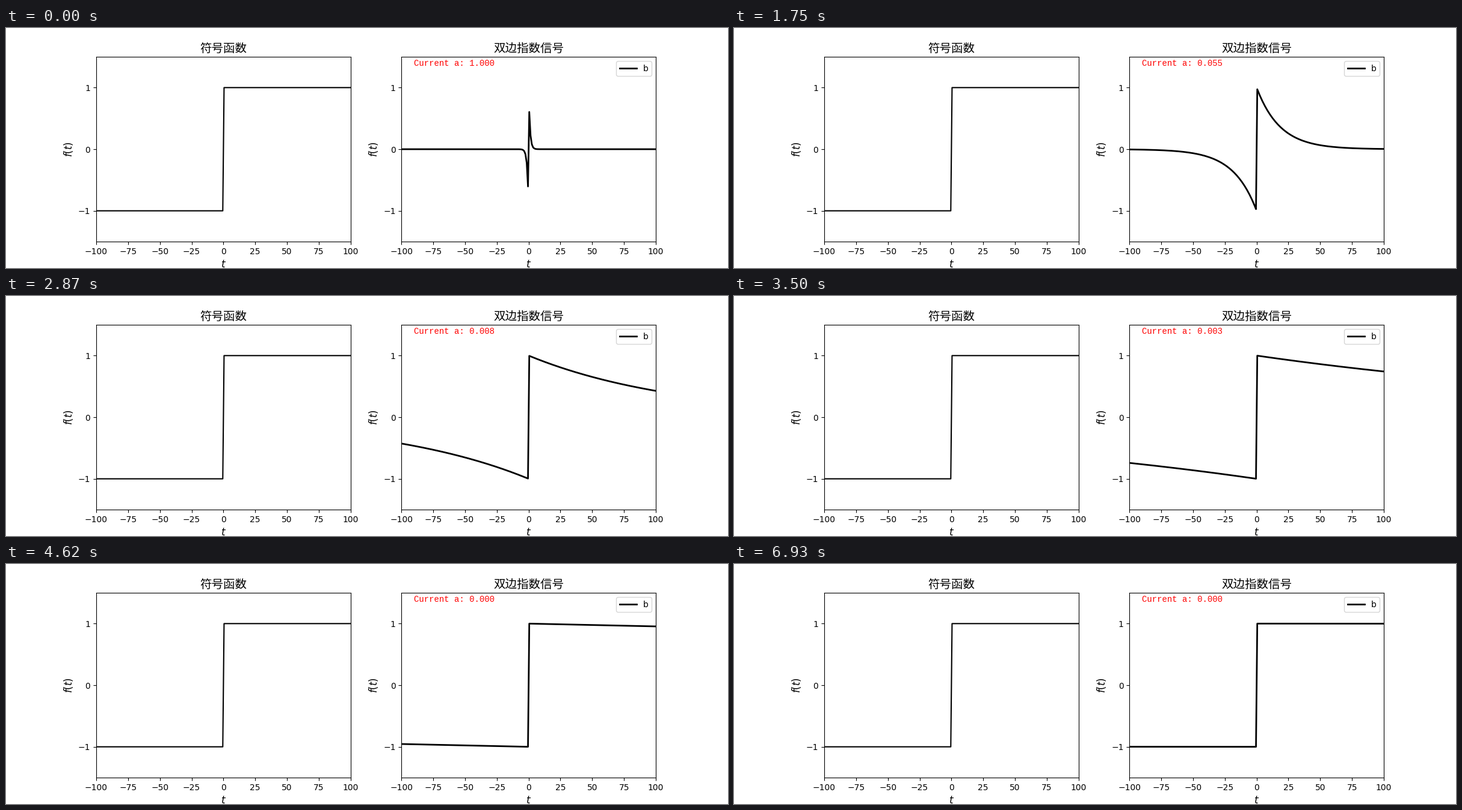
A matplotlib script for the animation above (7000 ms loop, 1200 px wide and 400 px high).

```python
import numpy as np
import matplotlib.pyplot as plt
from matplotlib.animation import FuncAnimation

FRAMES = 100
INTERVAL = 70  # ms

t = np.linspace(-100, 100, 200)
decay_rates = np.logspace(0, -5, FRAMES)


def two_sided_exponential(a):
    return np.sign(t) * np.exp(-a * np.abs(t))


def style_axes(ax, title):
    ax.set_title(title, fontfamily="Noto Sans CJK JP", fontsize=14, fontweight="light")
    ax.set_xlabel("$t$", fontsize=12)
    ax.set_ylabel("$f(t)$", fontsize=12)
    ax.set_xlim(-100, 100)
    ax.set_ylim(-1.5, 1.5)
    ax.set_xticks(np.arange(-100, 101, 25))
    ax.set_yticks([-1, 0, 1])


fig, (sign_ax, exp_ax) = plt.subplots(1, 2, figsize=(12, 4), dpi=100)
style_axes(sign_ax, "符号函数")
style_axes(exp_ax, "双边指数信号")

sign_ax.plot(t, np.sign(t), color="black", lw=1.5)
curve, = exp_ax.plot(t, two_sided_exponential(decay_rates[0]),
                     color="black", lw=2, label="b")
exp_ax.legend(loc="upper right")
readout = exp_ax.text(-90, 1.35, "", color="red",
                      fontfamily="Liberation Mono", fontsize=10)


def update(frame):
    a = decay_rates[frame]
    curve.set_ydata(two_sided_exponential(a))
    readout.set_text(f"Current a: {a:.3f}")
    return curve, readout


animation = FuncAnimation(fig, update, frames=FRAMES, interval=INTERVAL,
                          repeat=True, repeat_delay=0)
plt.show()
```
